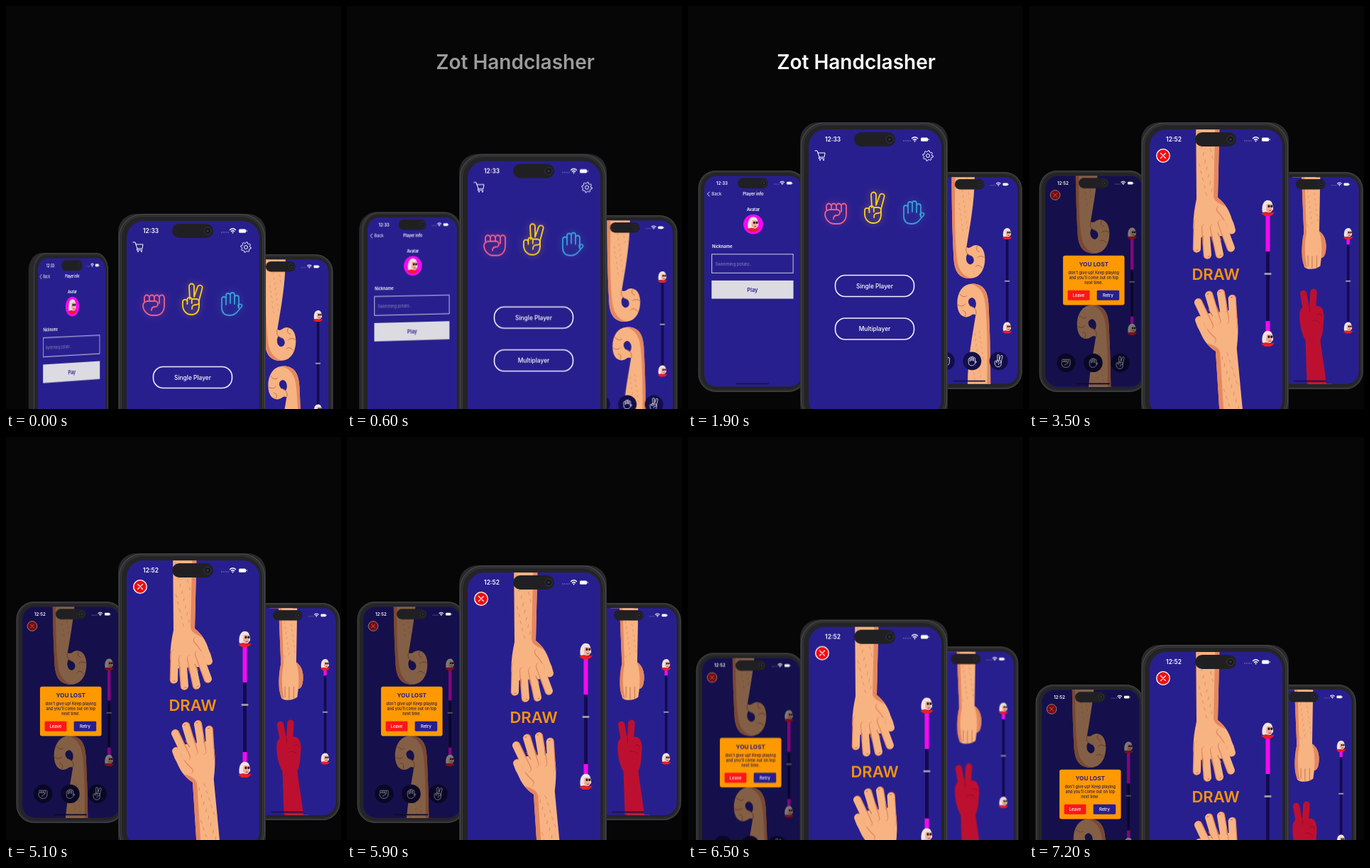
Write an HTML page that moves like this. It is 472 by 568 pixels and loops after 7500 ms.

```html
<!DOCTYPE html>
<html lang="en">
<head>
<meta charset="utf-8">
<title>Hand game showcase</title>
<style>
html, body { margin: 0; width: 100%; height: 100%; overflow: hidden; background: #060606; }
#stage { position: relative; width: 472px; height: 568px; overflow: hidden; font-family: Inter, sans-serif; }
h1 {
  position: absolute; left: 0; top: 62px; width: 474px; margin: 0;
  font: 600 28px/34px Inter, sans-serif; text-align: center; color: #fff;
  animation: title 7.5s linear infinite;
}
.phone {
  position: absolute; transform-origin: 50% 0; transform-style: preserve-3d;
  animation: 7.5s cubic-bezier(.3, .2, .5, 1) infinite;
}
.phone svg { position: absolute; inset: 0; width: 100%; height: 100%; }
.back { position: absolute; inset: 0; border-radius: 25px; background: #29292b; transform: translateZ(-9px); }
#left { left: 14px; top: 232px; width: 153px; height: 312px; animation-name: left; }
#right { left: 321px; top: 234px; width: 150px; height: 306px; animation-name: right; }
#center { left: 158px; top: 164px; width: 208px; height: 425px; animation-name: center; }
.second { animation: swap 7.5s linear infinite; }
text { font-family: Inter, sans-serif; }

@keyframes center {
  0% { transform: translateY(129px); }
  16.7%, 76% { transform: none; }
  96%, 100% { transform: translateY(129px); }
}
@keyframes left {
  0%, 1.3% { transform: translate(2px, 116px) perspective(2600px) rotateY(46deg); }
  19.3%, 78.9% { transform: translate(0, 0) perspective(2600px) rotateY(0deg); }
  96%, 100% { transform: translate(-5px, 117px) perspective(2600px) rotateY(0deg); }
}
@keyframes right {
  0%, 2% { transform: translate(-10px, 116px); }
  18.7%, 80.5% { transform: none; }
  96%, 100% { transform: translate(-10px, 115px); }
}
@keyframes title {
  0%, 2% { opacity: 0; }
  12%, 33% { opacity: 1; }
  41%, 100% { opacity: 0; }
}
@keyframes swap {
  0%, 33% { opacity: 0; }
  41%, 100% { opacity: 1; }
}
</style>
</head>
<body>
<svg width="0" height="0" style="position:absolute">
  <clipPath id="screen"><rect x="12" y="10" width="187" height="405" rx="24"/></clipPath>
</svg>
<div id="stage">
  <h1>Zot Handclasher</h1>
  <div class="phone" id="left"></div>
  <div class="phone" id="right"></div>
  <div class="phone" id="center"></div>
</div>
<script>
const BLUE = '#281f8e', SKIN = '#f7b382', SHADE = '#e5875f', LINE = '#bd6d48', PINK = '#f50af0';

const at = (x, y, body, extra = '') => `<g transform="translate(${x} ${y}) ${extra}">${body}</g>`;
const turn = (angle, cx, cy, body) => `<g transform="rotate(${angle} ${cx} ${cy})">${body}</g>`;
const rect = (x, y, w, h, r, fill, more = '') =>
  `<rect x="${x}" y="${y}" width="${w}" height="${h}" rx="${r}" fill="${fill}" ${more}/>`;
const circle = (x, y, r, fill, more = '') => `<circle cx="${x}" cy="${y}" r="${r}" fill="${fill}" ${more}/>`;
const path = (d, fill, more = '') => `<path d="${d}" fill="${fill}" ${more}/>`;
const stroke = (d, color, width, more = '') =>
  path(d, 'none', `stroke="${color}" stroke-width="${width}" stroke-linecap="round" stroke-linejoin="round" ${more}`);
const text = (x, y, size, weight, fill, body, anchor = 'middle') =>
  `<text x="${x}" y="${y}" font-size="${size}" font-weight="${weight}" fill="${fill}" text-anchor="${anchor}">${body}</text>`;

const icons = {
  fist: 'M-14-4V-9a3.5 3.5 0 0 1 7 0a3.5 3.5 0 0 1 7 0a3.5 3.5 0 0 1 7 0a3.5 3.5 0 0 1 7 0V2C14 11 9 16 2 16H-3C-10 16-16 9-16 2C-16-2-12-4-9-4H1a4 4 0 0 1 0 8C-3 4-4 7-4 9M-7-9V-4M0-9V-4M7-9V-1',
  palm: 'M-13-7a3 3 0 0 1 6 0V1V-12a3 3 0 0 1 6 0V-1V-13a3 3 0 0 1 6 0V0V-9a3 3 0 0 1 6 0V6L10 2C13-1 17 1 15 4L8 12C5 15 2 16-2 16C-9 16-13 12-13 5Z',
  peace: 'M-4-1L-5-19a3.5 3.5 0 0 1 7 0L2-4L7-18a3.4 3.4 0 0 1 6.5 2L9 1V8C9 17 5 21-2 21C-9 21-14 15-14 8V3a3.2 3.2 0 0 1 6.4 0V6V0a3.2 3.2 0 0 1 6.4 0V5M-1-1H5a4 4 0 0 1 0 8C0 7-1 9-1 13'
};

const hairs = (x, width, from, count) => {
  let d = '';
  for (let i = 0; i < count; i++)
    d += `M${x + (i * 11.7) % width} ${from + i * 5.1}l${i % 2 ? 1.5 : -1} 4`;
  return stroke(d, '#d08660', .8);
};

const avatar = (x, y, scale = .85) => at(x, y,
  path('M-9 8C-11-3-7-12 0-12C6-12 8-8 9 3L5 8H-6Z', '#eee4e2') +
  path('M-2-6H6L7 4L2 9L-3 4Z', '#efac94') +
  rect(0, -4, 3.5, 4, 1.5, '#20151d') + rect(4.5, -4, 3.5, 4, 1.5, '#20151d') +
  path('M-11 10L-3 7L3 9L11 8L8 12L4 14H-5Z', '#ed1d24') + stroke('M2 5H5', '#b3202a', 1),
  `scale(${scale})`);

const slider = (top, bottom) =>
  rect(176, 128, 5, 166, 1, '#130b50') +
  rect(175.5, 128, 6, top, 0, PINK) + rect(175.5, 294 - bottom, 6, bottom, 0, PINK) +
  rect(173.5, 212, 10, 3, 1, '#9a96a4') + avatar(178.5, 120) + avatar(178.5, 304);

const hook = () =>
  path('M70 0V-60H115V0C115 55 106 100 99 143C106 148 108 139 118 139C130 140 135 152 135 166C135 187 125 203 108 204C88 206 75 194 74 165C71 110 70 60 70 0ZM101 156C96 163 98 176 107 177C115 175 115 166 110 161Z', SKIN, 'fill-rule="evenodd"') +
  path('M70-60V0C70 60 71 110 74 165C76 194 90 206 108 204C90 199 82 185 80 162C75 110 76 60 78-60Z', SHADE) +
  stroke('M99 143C96 150 99 158 108 160M135 164C129 159 123 160 120 164M130 184C124 177 119 178 117 181M120 141C117 146 119 151 124 152', LINE, 1.3) +
  hairs(83, 22, -30, 28);

const openHand = () => {
  const fingers = 'M80 140L79 178M91 148L94 187M103 148L111 186M114 142L127 177M112 122Q124 134 128 152';
  return path('M77-20H111L108 106C118 114 127 126 129 144L117 160L84 162L73.5 150C73 136 75 122 78 108Z', SKIN) +
    stroke(fingers, SHADE, 10.5, 'transform="translate(-1 .5)"') + stroke(fingers, SKIN, 10) +
    path('M105-20H111L108 106C113 110 117 114 120 119C111 115 103 112 102 104Z', SHADE) +
    stroke('M87 160V168M98 160L101 169M108 156L113 166M78 180H80M94 189H96M111 188L113 187', LINE, 1) +
    hairs(81, 21, 12, 18);
};

const fistArm = () =>
  path('M87 0H124L122 116C131 122 137 134 135 152C134 163 130 168 126 168L124 184C116 191 99 192 93 186C86 167 88 138 92 119Z', SKIN) +
  path('M87 0H93L97 120C92 144 94 168 98 188C89 184 87 165 88 147Q89 129 92 119Z', SHADE) +
  path('M122 116C131 122 137 134 135 152C134 163 130 168 126 168Q129 138 122 116Z', SHADE) +
  stroke('M100 164V184M108 165V188M117 164V187', LINE, 1.2) +
  hairs(97, 22, 16, 18);

const redHand = () =>
  path('M98 420L95 330C87 316 82 294 84 274Q87 262 97 262H120C131 264 133 282 130 298Q130 316 124 329L137 420Z', '#bd1030') +
  stroke('M98 278L91 238M108 278L111 235', '#bd1030', 13) +
  stroke('M103 274V264M118 280Q124 274 127 282M108 292Q116 286 123 296', '#8e0b25', 1.2);

const hooks = (shift, cx, cy) => {
  const arm = at(0, shift, hook());
  return arm + turn(180, cx, cy, arm);
};
const choices = (x, y) => Object.values(icons).map((icon, i) =>
  at(x + i * 52, y, circle(0, 0, 18, '#130e48') + stroke(icon, '#fff', 2, 'transform="scale(.55)"'))).join('');
const close = () => circle(31, 47, 9.3, '#f20d12', 'stroke="#fff" stroke-width="1.3"') +
  stroke('M27.5 43.5l7 7m0-7l-7 7', '#fff', 1.1);
const homeBar = () => rect(72, 408, 64, 2.5, 1, '#171248');

const status = time =>
  text(46, 27, 8.4, 600, '#fff', time) +
  [146, 149, 152, 155].map(x => circle(x, 26, .7, '#9a98c4')).join('') +
  stroke('M157.5 22.5Q161.5 19 165.5 22.5M159.4 24.6Q161.5 22.8 163.6 24.6', '#fff', 1.4) + circle(161.5, 26.4, 1, '#fff') +
  rect(170, 21.5, 10, 5.2, 1.5, '#fff') + rect(180.6, 23, 1, 2.3, .5, '#fff');

const page = (time, body) => rect(12, 10, 188, 405, 0, BLUE) + body + status(time);

const phone = (id, first, second) => {
  document.getElementById(id).innerHTML = `<div class="back"></div><svg viewBox="0 0 208 425">
    ${rect(1.5, .7, 205, 423.6, 33, '#2c2c2e', 'stroke="#454548" stroke-width="1.4"')}
    ${rect(4.5, 3.5, 199, 418, 30, '#242426', 'stroke="#39393b"')}
    <g clip-path="url(#screen)">${first}<g class="second">${second}</g></g>
    ${rect(76, 14, 58, 20, 10, '#202023')}
    ${circle(126, 24, 5, '#17171d', 'stroke="#43434b" stroke-width=".8"')}${circle(126, 24, 1.8, '#343457')}
  </svg>`;
};

const neon = (name, x, y, color) => at(x, y,
  stroke(icons[name], color, 7, 'opacity=".13" style="filter:blur(4px)"') + stroke(icons[name], color, 1.8));
const pill = (y, label) =>
  rect(49.5, y, 111, 30, 14, 'none', 'stroke="#f2f1ff" stroke-width="1.6"') + text(105, y + 18.2, 8.4, 500, '#fff', label);

const cart = at(28, 46, stroke('M-7-6H-4L-1 3H6L7-3H-3M-1 3L-2 5H6', '#fff', 1) +
  circle(0, 7, 1, '#fff') + circle(5, 7, 1, '#fff'));
const gear = () => {
  let d = '';
  for (let i = 0; i < 32; i++) {
    const r = i % 4 < 2 ? 7.3 : 5.6, a = (i + .5) * Math.PI / 16;
    d += (i ? 'L' : 'M') + (r * Math.cos(a)).toFixed(1) + ' ' + (r * Math.sin(a)).toFixed(1);
  }
  return at(180, 47, stroke(d + 'Z', '#fff', 1) + circle(0, 0, 2.5, 'none', 'stroke="#fff"'));
};

const menu = cart + gear() +
  neon('fist', 51, 127, '#f0608c') + neon('peace', 105, 121, '#ffcf1c') + neon('palm', 159, 127, '#399fd6') +
  pill(215.5, 'Single Player') + pill(276, 'Multiplayer');

const profile = stroke('M22 41L18 45L22 49', '#fff', 1.2) +
  text(26, 48, 8.2, 400, '#fff', 'Back', 'start') + text(106, 48, 7.8, 600, '#fff', 'Player info') +
  text(106, 78, 8, 600, '#fff', 'Avatar') + circle(106, 103, 19, PINK) + avatar(106, 102, 1.1) +
  text(27, 149, 8, 600, '#fff', 'Nickname', 'start') +
  rect(26.5, 160.5, 156, 36, 0, 'none', 'stroke="#d8d6e8" stroke-width="1.3"') +
  text(33, 182, 8, 400, '#8a86ba', 'Swimming potato..', 'start') +
  rect(26, 211, 157, 35, 0, '#dcdbe2') + text(104.5, 232.5, 10, 600, BLUE, 'Play') + homeBar();

const popup = rect(46, 163, 118, 95, 4, '#ff9900') +
  text(105, 184, 11.2, 700, BLUE, 'YOU LOST') +
  ["don't give up! Keep playing", "and you'll come out on top", 'next time.'].map((line, i) =>
    text(105, 199 + i * 9.5, 7.5, 500, '#241a52', line)).join('') +
  rect(55, 230, 42, 19, 2, '#fb1717') + rect(111, 230, 43, 19, 2, BLUE) +
  text(76, 242.5, 8, 500, '#fff', 'Leave') + text(132.5, 242.5, 8, 500, '#fff', 'Retry');

const lost = hooks(-45, 104, 208.5) + slider(62, 14) + choices(52, 369) + close() + homeBar() +
  rect(12, 10, 188, 405, 0, '#000', 'opacity=".47"') + popup;

const draw = openHand() + turn(180, 105, 214, turn(-5, 98, 140, openHand())) + close() + slider(54, 14) +
  text(105, 222, 22, 600, '#f7940d', 'DRAW');

phone('left', page('12:33', profile), page('12:52', lost));
phone('right', page('12:33', hooks(4, 108, 213.5) + slider(0, 0) + choices(58, 370) + homeBar()),
  page('12:52', fistArm() + redHand() + slider(14, 0) + homeBar()));
phone('center', page('12:33', menu), page('12:52', draw));
</script>
</body>
</html>
```
